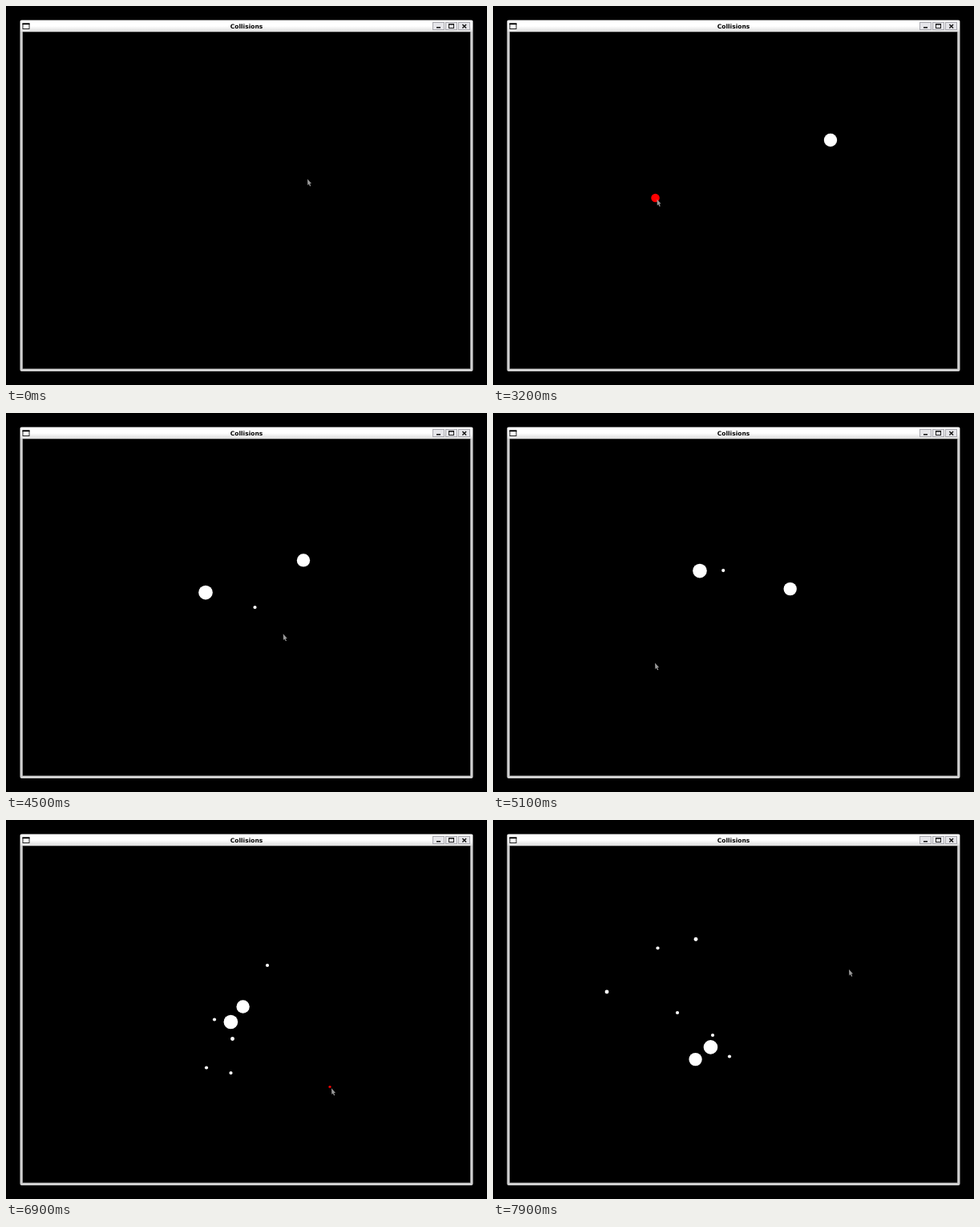
Animation of 600x472 px, one loop 8000 ms. Source, as an HTML page with a canvas:

```html
<!DOCTYPE html>
<html lang="en">
<head>
<meta charset="utf-8">
<title>Collisions</title>
<style>
html, body { margin: 0; width: 100%; height: 100%; overflow: hidden; background: #000; }
canvas { display: block; }
</style>
</head>
<body>
<canvas id="stage" width="600" height="472"></canvas>
<script>
const ctx = document.getElementById('stage').getContext('2d');
const LOOP = 8000, STEP = 100, GROWTH = 0.0091;

// The two big balls swing around a drifting centre; each swing ends in a bounce.
const RELEASE = 3700, CONTACT = 8.7;
const centre = [
  [RELEASE, 311.75, 203], [4500, 310, 203.5], [5900, 316.5, 217.3],
  [6900, 288, 242], [7900, 262, 290.5]
];
const swings = [
  { from: 2652, to: 4748, reach: 115, turn: [-0.318, -0.318] },
  { from: 4748, to: 6880, reach: 85.5, turn: [0.1, 0.69] },
  { from: 6880, to: 7920, reach: 68, turn: [-0.96, 2.53] }
];

function swinging(side) {
  return t => {
    t = Math.max(t, RELEASE);
    const { from, to, reach, turn } = swings.find(s => t < s.to);
    const u = (t - from) / (to - from);
    // Free fall from rest: close to (1 - s²)^(2/3)
    const gap = Math.max(CONTACT, reach * (4 * u * (1 - u)) ** (2 / 3));
    const angle = turn[0] + (turn[1] - turn[0]) * u;
    const [x, y] = glide(centre, t);
    return [x + side * gap * Math.cos(angle), y + side * gap * Math.sin(angle)];
  };
}

// A small dot flies from its launch through its last few stations.
const STATIONS = [4500, 5900, 6900, 7900];

function dot(press, free, x, y, ...points) {
  const times = STATIONS.slice(-points.length);
  const keys = [[free, x, y], ...points.map((p, i) => [times[i], ...p])];
  return { press, free, path: t => glide(keys, t) };
}

const bodies = [
  { arrive: 400, press: 510, free: 1410, path: swinging(1) },
  { arrive: 2500, press: 2620, free: 3590, path: swinging(-1) },
  dot(4200, 4400, 345, 273, [310.5, 242], [276.5, 155], [326, 181], [230, 240]),
  dot(5500, 5600, 150, 322, [178, 306], [260, 248.5], [274, 268]),
  dot(5730, 6000, 125, 329.5, [282.5, 272.5], [253, 148.5]),
  dot(6200, 6300, 188, 344, [250, 308.5], [205.5, 159.5]),
  dot(6500, 6600, 288, 352, [280.5, 315], [295, 294.5]),
  dot(6730, 7000, 404, 332.3, [142, 214])
];

// The pointer rests wherever a body is pressed.
const stops = [
  { arrive: 0, leave: 0, x: 376, y: 215.5 },
  { arrive: 2000, leave: 2000, x: 371, y: 195 },
  { arrive: 7900, leave: LOOP, x: 444, y: 186 },
  ...bodies.map(({ press, arrive = press, free, path }) => {
    const [x, y] = path(press);
    return { arrive, leave: free, x: x + 2, y: y + 1.8 };
  })
].sort((a, b) => a.arrive - b.arrive);

function slope(keys, i, axis) {
  const prev = keys[i - 1], next = keys[i + 1];
  return prev && next ? (next[axis] - prev[axis]) / (next[0] - prev[0]) : 0;
}

// Smooth curve through [time, x, y] keys, at rest on both ends
function glide(keys, t) {
  const last = keys.length - 1;
  t = Math.min(Math.max(t, keys[0][0]), keys[last][0]);
  const i = Math.max(1, keys.findIndex(k => k[0] >= t));
  const a = keys[i - 1], b = keys[i], span = b[0] - a[0], u = (t - a[0]) / span;
  return [1, 2].map(axis =>
    a[axis] + (b[axis] - a[axis]) * u * u * (3 - 2 * u)
      + span * u * (1 - u) * ((1 - u) * slope(keys, i - 1, axis) - u * slope(keys, i, axis)));
}

function box(x, y, w, h, fill) {
  ctx.fillStyle = fill;
  ctx.fillRect(x, y, w, h);
}

function outline(x, y, w, h, color) {
  ctx.strokeStyle = color;
  ctx.lineWidth = 1;
  ctx.strokeRect(x + 0.5, y + 0.5, w - 1, h - 1);
}

function drawWindow() {
  box(0, 0, 600, 472, '#000');
  ctx.fillStyle = '#d0d0d0';
  ctx.beginPath();
  ctx.roundRect(17.5, 17.5, 565, 437.5, 2);
  ctx.fill();
  const shade = ctx.createLinearGradient(0, 18, 0, 32);
  shade.addColorStop(0.5, '#fff');
  shade.addColorStop(1, '#dcdcdc');
  box(18, 18, 564, 14, shade);
  box(20.5, 32, 559, 420, '#777');
  box(21, 32.5, 558, 419, '#000');

  ctx.fillStyle = '#000';
  ctx.font = 'bold 7.5px "DejaVu Sans", sans-serif';
  ctx.textAlign = 'center';
  ctx.fillText('Collisions', 300, 27.7);

  box(20.5, 21.5, 9, 7.5, '#fff');
  outline(20.5, 21.5, 9, 7.5, '#222');
  box(20.5, 21.5, 9, 1.7, '#000');

  for (const x of [532, 548, 564]) {
    box(x, 20, 15, 10, '#e6e6ea');
    outline(x, 20, 15, 10, '#aaaab0');
  }
  box(537, 26, 5, 1.5, '#111');
  outline(552, 22, 7, 6, '#222');
  box(552, 22, 7, 1.5, '#111');
  ctx.strokeStyle = '#111';
  ctx.lineWidth = 1.4;
  ctx.stroke(new Path2D('M569.4 22.9l4.7 4.7m0-4.7l-4.7 4.7'));
}

function drawBody({ press, free, path }, t) {
  if (t <= press) return;
  const held = t < free;
  const size = GROWTH * (Math.min(t, free) - press);
  const [x, y] = path(t);
  ctx.fillStyle = held ? '#f00' : '#fff';
  ctx.beginPath();
  ctx.arc(x, y, held ? size : Math.max(size, 2.1), 0, 7);
  ctx.fill();
}

function drawPointer(t) {
  if (t >= 2200 && t < 2400) return;
  const i = stops.findLastIndex(s => s.arrive <= t);
  const a = stops[i], b = stops[i + 1] || a;
  const u = t > a.leave ? (t - a.leave) / (b.arrive - a.leave) : 0;
  const ease = u ** 3 * (u * (6 * u - 15) + 10);
  ctx.save();
  ctx.translate(a.x + (b.x - a.x) * ease, a.y + (b.y - a.y) * ease);
  ctx.fillStyle = '#999';
  ctx.fill(new Path2D('M0 0L5 5.6L3 5.8L4.3 8.6L3 9L1.9 6.3L.3 7.7Z'));
  ctx.restore();
}

const begin = performance.now();

function tick() {
  const t = Math.floor(((performance.now() - begin) % LOOP) / STEP) * STEP;
  drawWindow();
  bodies.forEach(body => drawBody(body, t));
  drawPointer(t);
  requestAnimationFrame(tick);
}
tick();
</script>
</body>
</html>
```
